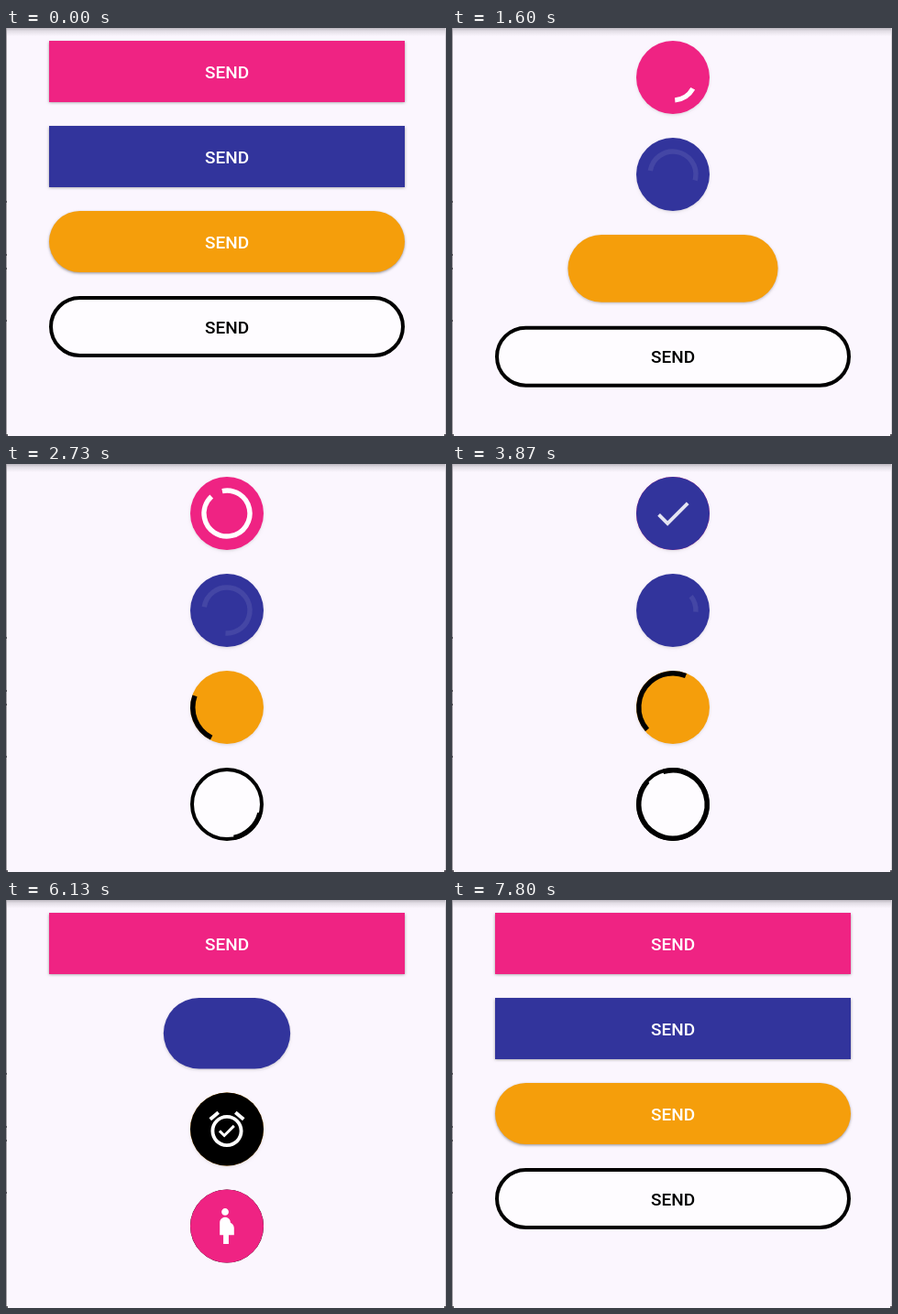
An HTML page with a canvas for the animation above (7870 ms loop, 480x446 px).

```html
<!DOCTYPE html>
<html lang="en">
<head>
<meta charset="utf-8">
<title>Loading buttons</title>
<style>
  html, body { margin: 0; width: 100%; height: 100%; overflow: hidden; background: #fbf6fe; }
  canvas { display: block; width: 480px; height: 446px; }
</style>
</head>
<body>
<canvas id="stage" width="480" height="446"></canvas>
<script>
const ctx = document.getElementById('stage').getContext('2d');
const LOOP = 7870, MORPH = 300, REVEAL = 120, FADE = 80;
const CX = 241, TOP = 14, GAP = 26;
const WIDE = 388, SHORT = 67, ROUND = 80;
const PINK = '#ef2383', INDIGO = '#32349c', ORANGE = '#f59e0b';

// 24-unit icon outlines
const ICONS = {
  check: 'M9 16.2L4.8 12l-1.4 1.4L9 19 21 7l-1.4-1.4L9 16.2z',
  alarm: 'M22 5.72l-4.6-3.86-1.29 1.53 4.6 3.86L22 5.72zM7.88 3.39L6.6 1.86 2 5.71l1.29 1.53 4.59-3.85z' +
    'M12 4c-4.97 0-9 4.03-9 9s4.02 9 9 9c4.97 0 9-4.03 9-9s-4.03-9-9-9zm0 16c-3.87 0-7-3.13-7-7s3.13-7 7-7 7 3.13 7 7-3.13 7-7 7z' +
    'm-1.46-5.47L8.41 12.4l-1.06 1.06 3.18 3.18 6-6-1.06-1.06-4.93 4.95z',
  person: 'M9 4c0-1.11.89-2 2-2s2 .89 2 2-.89 2-2 2-2-.89-2-2zm7 9c-.01-1.34-.83-2.51-2-3 0-1.66-1.34-3-3-3s-3 1.34-3 3v7h2v5h3v-5h3v-4z'
};

const buttons = [
  { fill: PINK, ink: '#fff', spin: '#fff', ring: 25, tap: 663, done: 3690, revert: 5640, doneFill: INDIGO, icon: 'check' },
  { fill: INDIGO, ink: '#fff', spin: '#4446a5', ring: 25, tap: 1050, done: Infinity, revert: 6045 },
  { fill: ORANGE, ink: '#fff', spin: '#000', ring: 37.2, pill: true, tap: 1448, done: 4475, revert: 6443, doneFill: '#000', icon: 'alarm' },
  { fill: '#fefcff', ink: '#000', spin: '#000', ring: 37.2, pill: true, line: 4, tap: 1830, done: 4857, revert: 6825, doneFill: PINK, icon: 'person' }
];
for (const b of buttons) if (b.icon) b.path = new Path2D(ICONS[b.icon]);

const clamp = x => Math.max(0, Math.min(1, x));
const smooth = x => (1 - Math.cos(Math.PI * clamp(x))) / 2;
const mix = (a, b, p) => a + (b - a) * p;
const collapse = (b, t) => smooth((t - b.tap) / MORPH) - smooth((t - b.revert) / MORPH);

function disc(cy, r, color) {
  ctx.fillStyle = color;
  ctx.beginPath();
  ctx.arc(CX, cy, r, 0, 2 * Math.PI);
  ctx.fill();
}

function drawShape(b, y, w, h, p) {
  const r = b.pill ? h / 2 : Math.min(h / 2, 70 * p);
  const inset = (b.line || 0) / 2;
  ctx.save();
  ctx.beginPath();
  ctx.roundRect(CX - w / 2 + inset, y + inset, w - 2 * inset, h - 2 * inset, Math.max(0, r - inset));
  ctx.fillStyle = b.fill;
  if (!b.line) {
    ctx.shadowColor = `rgba(0,0,0,${0.38 * (1 - 0.7 * p)})`;
    ctx.shadowBlur = 3;
    ctx.shadowOffsetY = 1.3;
  }
  ctx.fill();
  if (b.line) {
    ctx.lineWidth = b.line;
    ctx.strokeStyle = b.ink;
    ctx.stroke();
  }
  ctx.restore();
}

// The arc alternately shrinks and grows while the whole ring turns every 2 s.
function drawSpinner(b, cy, age) {
  const phase = Math.floor(age / 900);
  const x = age / 900 - phase;
  const s = 300 * (1 - (1 - x) ** 2);
  const base = age * 0.18 - 60 * Math.ceil(phase / 2);
  const growing = phase % 2 === 1;
  const from = growing ? base : base + s;
  const sweep = growing ? s + 30 : 330 - s;
  const rad = Math.PI / 180;
  ctx.strokeStyle = b.spin;
  ctx.lineWidth = 5.4;
  ctx.beginPath();
  ctx.arc(CX, cy, b.ring, from * rad, (from + sweep) * rad);
  ctx.stroke();
}

function drawDone(b, cy, age) {
  disc(cy, ROUND / 2 * smooth(age / REVEAL), b.doneFill);
  const alpha = smooth((age - REVEAL) / FADE);
  if (!alpha) return;
  const k = 1.95;
  ctx.save();
  ctx.globalAlpha = alpha;
  ctx.translate(CX - 12 * k, cy - 12 * k);
  ctx.scale(k, k);
  ctx.fillStyle = '#fff';
  ctx.fill(b.path);
  ctx.restore();
}

function drawButton(b, y, t) {
  const p = collapse(b, t);
  const w = mix(WIDE, ROUND, p), h = mix(SHORT, ROUND, p), cy = y + h / 2;
  drawShape(b, y, w, h, p);
  if (t < b.tap || t >= b.revert + MORPH) {
    ctx.fillStyle = b.ink;
    ctx.fillText('SEND', CX, cy + 7);
  } else if (t >= b.tap + MORPH && t < b.revert) {
    if (t < b.done + REVEAL) drawSpinner(b, cy, t - b.tap - MORPH);
    if (t >= b.done) drawDone(b, cy, t - b.done);
  }
  return h;
}

function drawBackdrop() {
  ctx.fillStyle = '#fbf6fe';
  ctx.fillRect(0, 0, 480, 446);
  const g = ctx.createLinearGradient(0, 0, 0, 9);
  g.addColorStop(0, 'rgba(60,56,64,.32)');
  g.addColorStop(0.4, 'rgba(60,56,64,.12)');
  g.addColorStop(1, 'rgba(60,56,64,0)');
  ctx.fillStyle = g;
  ctx.fillRect(0, 0, 480, 9);
  ctx.fillStyle = '#a5a1a8';
  ctx.fillRect(0, 0, 1, 446);
  ctx.fillStyle = '#d9d4dc';
  ctx.fillRect(479, 0, 1, 446);
  ctx.fillStyle = '#55525a';
  for (const y of [189, 247, 262, 319]) ctx.fillRect(0, y, 1, 2);
  for (const x of [0, 478]) ctx.fillRect(x, 444, 2, 2);
}

function draw(t) {
  drawBackdrop();
  ctx.font = '500 19px Roboto, sans-serif';
  ctx.textAlign = 'center';
  let y = TOP;
  for (const b of buttons) y += drawButton(b, y, t) + GAP;
}

const start = performance.now();
function tick() {
  draw((performance.now() - start) % LOOP);
  requestAnimationFrame(tick);
}
tick();
</script>
</body>
</html>
```
